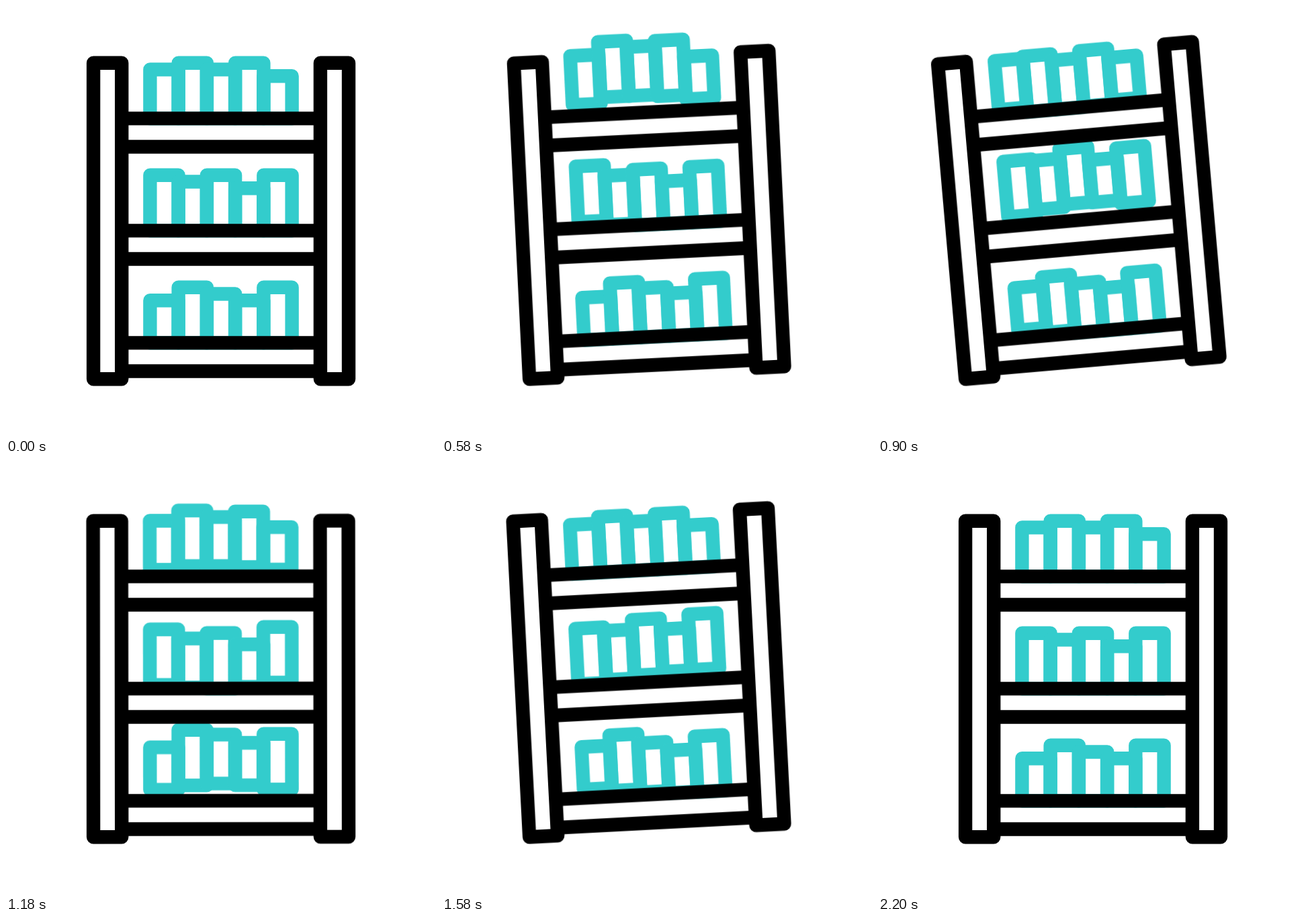
Write an HTML page that moves like this. It is 640 px wide and 640 px high and loops after 2.4 s.

```html
<!DOCTYPE html>
<html lang="en">
<head>
<meta charset="utf-8">
<title>Bookshelf</title>
<style>
  html, body { margin: 0; height: 100%; overflow: hidden; background: #fff; }
  svg { display: block; width: 100vw; height: 100vh; }

  .shelf {
    fill: none;
    stroke: #000;
    stroke-width: 20.4;
    stroke-linejoin: round;
    transform-origin: 130px 555px;
    animation: tilt 2400ms infinite;
  }
  .books { stroke: #33cccc; }
  .books rect { animation: hop 2400ms infinite both; }

  /* The easing is an exact smoothstep */
  .shelf, .books rect { animation-timing-function: cubic-bezier(.33333, 0, .66667, 1); }

  @keyframes tilt {
    0%, 8.3333% { transform: rotate(0deg); }
    37.5% { transform: rotate(-5deg); }
    50% { transform: rotate(0deg); }
    66.6667% { transform: rotate(-3deg); }
    79.1667%, 100% { transform: rotate(0deg); }
  }
  @keyframes hop {
    0%, 25%, 50%, 100% { transform: translateY(0); }
    12.5% { transform: translateY(-25.6px); }
    37.5% { transform: translateY(-15.4px); }
  }
</style>
</head>
<body>
<svg viewBox="0 0 640 640">
  <g class="shelf">
    <g class="books"></g>
    <path d="M172 167.4H468M172 209.5H468M172 334.4H468M172 376.5H468M172 501.4H468M172 543.5H468"/>
    <rect x="130.1" y="84.8" width="42.1" height="470.4"/>
    <rect x="467.9" y="84.8" width="42.1" height="470.4"/>
  </g>
</svg>
<script>
  const books = document.querySelector('.books');
  const pitch = 42.24;

  // Per row: baseline, height step of each book, hop start of each book in ms
  const rows = [
    { base: 167.4, steps: [1, 2, 1, 2, 0], starts: [160, 280, 280, 340, 400] },
    { base: 334.4, steps: [2, 1, 2, 0, 2], starts: [460, 520, 580, 640, 700] },
    { base: 501.4, steps: [0, 2, 1, 0, 2], starts: [760, 820, 880, 940, 1000] }
  ];

  function addBook(x, base, height, start) {
    const book = document.createElementNS('http://www.w3.org/2000/svg', 'rect');
    const box = { x, y: base - height, width: pitch, height };
    for (const key in box) book.setAttribute(key, box[key].toFixed(2));
    book.style.animationDelay = start + 'ms';
    books.append(book);
  }

  for (const { base, steps, starts } of rows) {
    steps.forEach((step, i) =>
      addBook(214.4 + i * pitch, base, 63.2 + step * 9.75, starts[i]));
  }
</script>
</body>
</html>
```
